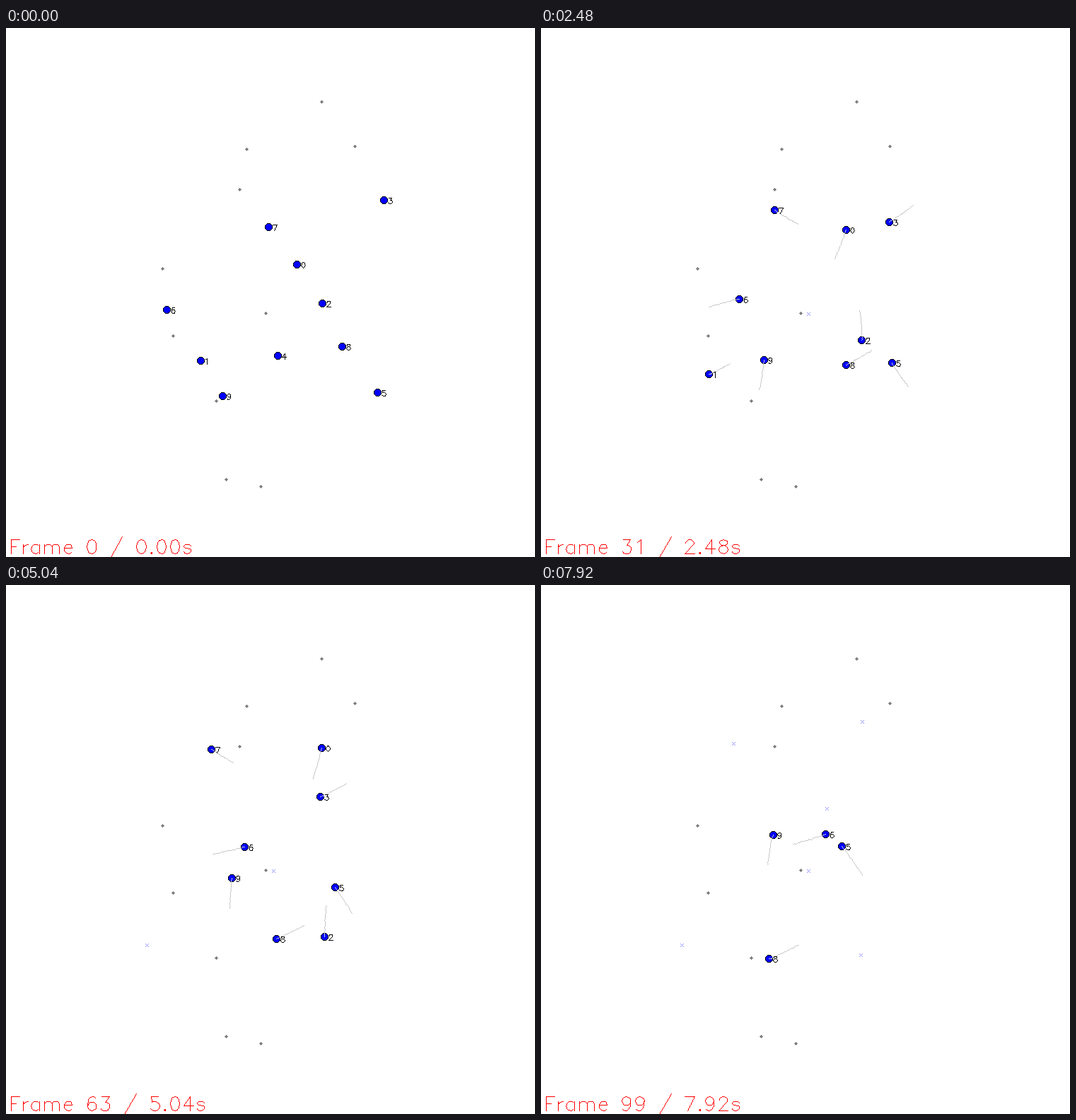
A matplotlib script for the animation above (8 s loop, 748 by 748 pixels).

```python
import numpy as np
import matplotlib.pyplot as plt
from matplotlib.animation import FuncAnimation
from matplotlib.collections import PolyCollection

SIZE, DPI = 748, 68
FRAMES, INTERVAL = 100, 80
TRAIL = 25
rng = np.random.default_rng(4)


def arc(cx, cy, rx, ry, start, stop):
    t = np.radians(np.linspace(start, stop, 13))
    return list(zip(cx + rx * np.cos(t), cy + ry * np.sin(t)))


def arch(x):
    return arc(x + 5.5, 9, 5.5, 5, 180, 0) + [(x + 11, 0)]


# Single-stroke glyphs: y runs up from the baseline, capitals are 21 high.
BOWL = arc(9.5, 7, 6.5, 7, 50, 310)
NINE = [arc(9.5, 14.5, 6.5, 6.5, 0, 360), arc(8.5, 12, 7.5, 12, 10, -125)]
GLYPHS = {
    "0": [arc(10, 10.5, 7, 10.5, 0, 360)],
    "1": [[(6, 17), (11, 21), (11, 0)]],
    "2": [arc(10, 15.5, 6, 5.5, 175, -25) + [(3, 0), (17, 0)]],
    "3": [[(5, 21), (16, 21)] + arc(9.8, 6.5, 7.2, 6.5, 88, -150)],
    "4": [[(13, 0), (13, 21), (3, 7), (18, 7)]],
    "5": [[(15, 21), (5, 21)] + arc(9.8, 7, 7.2, 7, 130, -150)],
    "6": [[(20 - x, 21 - y) for x, y in stroke] for stroke in NINE],
    "7": [[(3, 21), (17, 21), (7, 0)]],
    "8": [arc(10, 16.7, 6, 4.3, 0, 360), arc(10, 6.2, 7, 6.2, 0, 360)],
    "9": NINE,
    "F": [[(17, 21), (4, 21), (4, 0)], [(4, 11), (12, 11)]],
    "r": [[(4, 14), (4, 0)], arc(12, 7, 8, 7, 180, 90)],
    "a": [[(15, 14), (15, 0)], BOWL],
    "m": [[(4, 14), (4, 0)], arch(4), arch(15)],
    "e": [[(3, 8), (15, 8)] + BOWL],
    "s": [arc(8.5, 11, 5.5, 3, 20, 270) + arc(8.5, 4, 5.5, 4, 90, -160)],
    "/": [[(20, 25), (2, -7)]],
    ".": [arc(5, 1, 1, 1, 0, 360)],
    " ": [],
}
ADVANCE = {"F": 18, "r": 13, "a": 19, "m": 30, "e": 18, "s": 17,
           "/": 22, ".": 10, " ": 16}


def trace(points):
    """Pixels of a one-pixel polyline."""
    points = np.rint(points)
    cells = [np.empty((0, 2))]
    for a, b in zip(points, points[1:]):
        steps = int(np.abs(b - a).max())
        cells.append(np.rint(np.linspace(a, b, steps + 1)))
    return np.concatenate(cells)


def text_cells(text, x, baseline, scale):
    cells = []
    for char in text:
        for stroke in GLYPHS[char]:
            cells.append(trace(np.array(stroke) * (scale, -scale) + (x, baseline)))
        x += ADVANCE.get(char, 20) * scale
    return cells


def walk(end, *points):
    """Smooth path through evenly timed points, with a slight tremble."""
    knots = np.linspace(0, end, len(points))
    curve = np.polyfit(knots, np.array(points), len(points) - 1)
    t = np.arange(end + 1)[:, None]
    path = sum(c * t ** p for c, p in zip(curve, range(len(points) - 1, -1, -1)))
    path[1:-1] += rng.normal(0, 0.3, path[1:-1].shape)
    return np.floor(path + 0.3)


WALKS = [
    walk(86, (411, 334), (429.5, 289.3), (443.3, 240.3), (454, 193)),
    walk(61, (275.5, 470), (250, 483.5), (226, 496), (199.5, 509)),
    walk(78, (447.5, 389.5), (453.3, 432.8), (451, 477.5), (452, 523)),
    walk(88, (534.5, 243.5), (494, 273), (450.3, 296.5), (404.5, 316)),
    walk(31, (384, 463.5), (383.5, 445), (382, 424.5), (378.5, 404.5)),
    walk(100, (525, 515), (493.5, 470.3), (461.7, 421.5), (424.5, 368)),
    walk(100, (227, 398), (284, 382), (343.5, 369.3), (403.5, 351.5)),
    walk(81, (370.7, 281), (335, 260.5), (301, 239), (272.5, 224)),
    walk(100, (475.5, 450.5), (428, 477.7), (376.3, 503), (320.5, 530)),
    walk(100, (306, 520.5), (315.4, 465), (319.3, 407.7), (328, 351.5)),
]
LANDMARKS = [(446, 104), (493, 167), (340, 171), (330, 228), (221, 340),
             (236, 435), (367, 403), (297, 527), (311, 638), (360, 648)]

GRID = np.array([(x, y) for x in range(-5, 6) for y in range(-5, 6)])
DISTANCE = (GRID ** 2).sum(axis=1)
DISC = GRID[DISTANCE <= 24]
RING = GRID[(DISTANCE > 24) & (DISTANCE < 30)]
DIAMOND = GRID[np.abs(GRID).sum(axis=1) <= 2]
CROSS = np.array([(d, s * d) for d in range(-2, 3) for s in (-1, 1)])

fig = plt.figure(figsize=(SIZE / DPI, SIZE / DPI), dpi=DPI, facecolor="white")
ax = fig.add_axes([0, 0, 1, 1])
ax.set(xlim=(0, SIZE), ylim=(SIZE, 0))
ax.axis("off")

UNIT = np.array([(0, 0), (1, 0), (1, 1), (0, 1)])


def add_layer(color, zorder):
    layer = PolyCollection([], facecolors=color, edgecolors="none",
                           linewidths=0, zorder=zorder)
    return ax.add_collection(layer, autolim=False)


def fill(layer, cells):
    cells = np.concatenate([np.empty((0, 2)), *cells])
    layer.set_verts(cells[:, None, :] + UNIT)


fill(add_layer("#808080", 1), [DIAMOND + p for p in LANDMARKS])
crosses = add_layer("#9696ff", 1)
discs = add_layer("blue", 2)
rings = add_layer("black", 3)
trails = add_layer("#c8c8c8", 4)
labels = add_layer("black", 5)
counter = add_layer("red", 6)


def update(frame):
    walking = [(i, path) for i, path in enumerate(WALKS) if frame < len(path) - 1]
    fill(crosses, [CROSS + path[-1] for path in WALKS if frame >= len(path) - 1])
    fill(discs, [DISC + path[frame] for _, path in walking])
    fill(rings, [RING + path[frame] for _, path in walking])
    fill(trails, [trace(path[max(0, frame - TRAIL):frame + 1]) for _, path in walking])
    fill(labels, [cells for i, path in walking
                  for cells in text_cells(str(i), *(path[frame] + 5), 0.4)])
    seconds = frame * INTERVAL / 1000
    fill(counter, text_cells(f"Frame {frame} / {seconds:.2f}s", 3, 743, 0.95))
    return [crosses, discs, rings, trails, labels, counter]


anim = FuncAnimation(fig, update, frames=FRAMES, interval=INTERVAL,
                     repeat=True, repeat_delay=0, blit=False)
plt.show()
```
